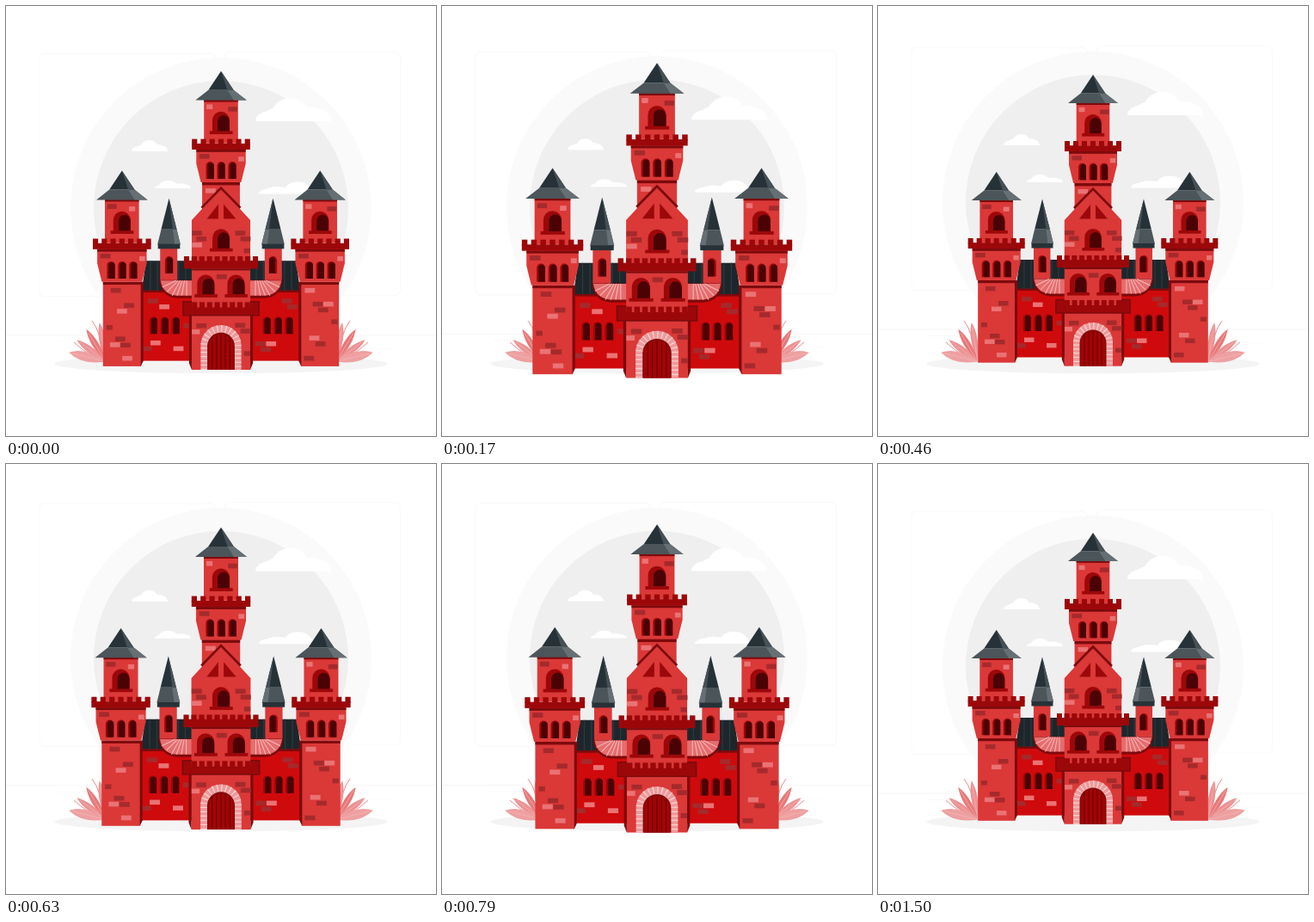
Recreate the animation shown at these times as an HTML page. Size 500 px wide and 500 px high, loop 1540 ms.

```html
<!DOCTYPE html>
<html lang="en">
<head>
<meta charset="utf-8">
<title>Castle</title>
<style>
  html, body { margin: 0; width: 100%; height: 100%; overflow: hidden; background: #fff; }
  svg { display: block; width: 100%; height: 100%; }
</style>
</head>
<body>
<svg id="stage" viewBox="0 0 500 500"></svg>
<script>
const RED = '#db3838', WALL = '#cf0a0c', DEEP = '#9c080a', SHADE = '#7d0a0c', NIGHT = '#4a0204';
const BRICK = '#a52a2b', PALE = '#ea7374', SLATE = '#263238', GREY = '#4b555a', STONE = '#f5baba';

const rect = (x, y, w, h, fill) => `<rect x="${x}" y="${y}" width="${w}" height="${h}" fill="${fill}"/>`;
const poly = (points, fill) => `<polygon points="${points}" fill="${fill}"/>`;
const path = (d, fill, more = '') => `<path d="${d}" fill="${fill}" ${more}/>`;
const line = (d, color, width, more = '') => path(d, 'none', `stroke="${color}" stroke-width="${width}" ${more}`);
const group = (transform, body) => `<g transform="${transform}">${body}</g>`;
const mirror = body => body + group('translate(500 0) scale(-1 1)', body);
const repeat = (n, draw) => Array.from({ length: n }, (_, i) => draw(i)).join('');

const arch = (x, y, w, h, fill) =>
  path(`M${x} ${y + h}v${w / 2 - h}a${w / 2} ${w / 2} 0 0 1 ${w} 0v${h - w / 2}z`, fill);
const bigWindow = (x, y) =>
  arch(x, y, 19.5, 23, DEEP) + arch(x + 6, y + 4, 13.5, 19, NIGHT) + rect(x - 3, y + 22, 26, 3.6, DEEP);
const slit = (x, y) => arch(x, y, 9, 19.5, DEEP) + arch(x + 2, y + 1, 7, 18.5, NIGHT);
const slits = (x, y) => repeat(3, i => slit(x + i * 12.6, y));

const brick = (x, y, fill, w = 11.5) => rect(x, y, w, 5.4, fill);
// Two bricks in neighbouring courses, the lower one shifted sideways
const bond = (x, y, shift, upper = BRICK, lower = PALE) => brick(x, y, upper) + brick(x + shift, y + 6.6, lower);

const merlons = (x, y, w, n) => repeat(n, i => rect(x + i * (w - 6) / (n - 1), y, 6, 6.5, DEEP));
const battlement = (x, y, w, h, n) => merlons(x, y, w, n) + rect(x, y + 5.2, w, h - 5.2, DEEP);

// Cone split into a dark tip, a grey foot and a lit right side
const facets = (top, bottom, y, end) =>
  poly([-top, y, top, y, bottom, end, -bottom, end], GREY) +
  poly([top / 2, y, top, y, bottom, end, bottom / 2, end], '#667074') +
  poly([0, 0, top, y, -top, y], SLATE) +
  poly([0, 0, top, y, top / 2, y], '#465157');

// Tower head, drawn from the tip of its roof
const towerHead = (x, y, near, far) => group(`translate(${x} ${y})`,
  rect(-19.3, 32, 38.6, 50, RED) + rect(-19.3, 32, 38.6, 3, SHADE) +
  brick(-16.5, 37.8, near, near === BRICK ? 10.5 : 7) + brick(8, 40.5, far, far === BRICK ? 10.5 : 7) +
  facets(14.3, 29, 21.5, 33) +
  bigWindow(-9.8, 46) +
  poly('-28,88 28,88 28,105 22.8,126 -22.8,126 -28,105', RED) +
  rect(-28, 89, 56, 2.8, SHADE) +
  brick(-24.5, 94, BRICK) + brick(19.7, 97, PALE, 6.5) +
  battlement(-33, 77, 66, 12, 7) +
  slits(-17, 102.8));

const turret = group('translate(191 224.5)',
  rect(-10, 55, 19.5, 40, RED) + slit(-4.5, 65.5) +
  facets(8.8, 13, 35, 52) +
  rect(-12.5, 51.5, 25, 5.5, SLATE));

const wing =
  poly('165,295 218,295 218,330 160,330', '#1d272b') +
  repeat(6, i => line(`M${170 + i * 8} 295V329`, '#35424a', .8)) +
  rect(160, 329, 58, 79.5, WALL) + rect(160, 328.5, 58, 2.5, SHADE) +
  turret +
  path('M180 317H218V337.5H200Q182 336 180 317z', SHADE) +
  path('M181.5 317.5H218V334.5H200Q184 333.5 181.5 317.5z', '#e56d6e') +
  repeat(6, i => line(`M${199 + i * 2.4} 317.5L${183.5 + i * 5.5} ${325 + Math.min(9.5, i * 5)}`, STONE, 1));

const base =
  rect(116.2, 319, 43.3, 95.7, RED) +
  poly('159,319 162,319 162,408.5 159,414.7', SHADE) +
  rect(116.2, 319, 43.3, 3.2, SHADE);

const keep =
  rect(228.6, 205, 42.8, 45, RED) + rect(228.6, 206, 42.8, 3.4, SHADE) + brick(232.5, 213, PALE) +
  towerHead(250, 80, PALE, BRICK) +
  poly('250,213 283.2,249 283.2,418.7 216.8,418.7 216.8,249', RED) +
  line('M228 235L250 212.5L272 235', SHADE, 2.6) +
  poly('234,247.5 247,231 247,247.5', DEEP) + poly('253,231 253,247.5 267,247.5', DEEP) +
  bond(217, 261, 5, BRICK, BRICK) + brick(217, 274.5, PALE) + bond(266, 261, 6, BRICK, BRICK) +
  brick(276, 281, BRICK, 7) + brick(245, 310.5, BRICK) +
  bigWindow(240.3, 259) +
  battlement(208, 290, 84, 14, 10) + rect(217, 304, 66, 2, SHADE) +
  bigWindow(223, 311) + bigWindow(257.3, 311) +
  mirror(poly('213.8,357 216.8,357 216.8,418.7 213.8,411', SHADE)) +
  rect(207, 341.5, 86, 15.5, DEEP) + rect(217, 341, 66, 7, RED) +
  merlons(217, 342, 66, 8) +
  line('M217 341.5H207V357H293V341.5H283', SHADE, 1.6) +
  brick(222, 366, BRICK) + bond(266, 365.5, 6, BRICK, BRICK) + brick(217, 373, PALE, 9) + brick(276, 397.5, BRICK, 7) +
  arch(227, 368, 46, 50.7, '#ee9a9b') +
  line('M231 418.7V391a19 19 0 0 1 38 0V418.7', '#f8d2d2', 8, 'stroke-dasharray="1.2 3.6"') +
  arch(234.5, 376.5, 31, 42.2, SHADE) + arch(235.7, 378, 28.6, 40.7, '#a00506') +
  repeat(5, i => line(`M${240 + i * 5} ${381 - 3 * Math.sin(i * Math.PI / 4)}V418.5`, '#6b0305', 1));

const castle =
  mirror(wing) +
  slits(168.8, 358.5) + slits(297.3, 358.5) +
  bond(167, 338, 13) + bond(170, 385.5, -10, PALE, BRICK) + brick(196, 392, PALE) + brick(207.5, 366, BRICK) +
  bond(319, 338, 6, BRICK, BRICK) + bond(289, 386.5, 6, BRICK, BRICK) + brick(301, 386.5, PALE) +
  mirror(base) +
  towerHead(137.7, 193, BRICK, PALE) + towerHead(362.3, 193, PALE, BRICK) +
  brick(125, 326, BRICK) + bond(140, 343, -8) + brick(120, 368, BRICK, 7) +
  bond(130, 381, -6) + brick(136, 388, BRICK) + brick(138, 403, PALE) +
  brick(345, 326, PALE) + bond(354, 341.5, 6, BRICK, BRICK) + brick(366, 341.5, PALE) +
  brick(375, 361.5, BRICK, 7) + bond(350, 380, 7, PALE, BRICK) + brick(344, 403, BRICK) +
  keep;

// Leaf with its root at the origin, pointing along the angle
const leaf = (angle, length, width, fill) => group(`translate(116 413.5) rotate(${angle})`,
  path(`M0 0Q${length * .6} ${-width} ${length} 0Q${length * .6} ${width} 0 0`, fill) +
  line(`M0 0H${length * .9}`, STONE, .6));
const plant =
  line('M113 413Q94 405 79 391M113 410Q111 380 100 366', '#e98c8d', 1) +
  repeat(4, i => leaf(261 - i * 22, 46 - i * 2, 7.5, i % 2 ? '#e67879' : '#eb9293')) +
  leaf(194, 44, 11, '#eea0a1');

// Flat-bottomed cloud with three bumps, the tallest at "peak" of its width
const cloud = (x, y, w, h, peak) => {
  const bump = (from, to, height) => {
    const rise = y - h * height * 1.33;
    return `M${x + w * from} ${y}C${x + w * from} ${rise} ${x + w * to} ${rise} ${x + w * to} ${y}z`;
  };
  return path(bump(0, .45, .45) + bump(peak - .28, peak + .26, 1) + bump(peak - .05, 1, .6) +
    bump(.08, .6, .6), '#fff');
};
const clouds =
  cloud(290, 134, 88, 27, .47) + cloud(146, 169, 42, 13, .5) +
  cloud(173, 212, 42, 9, .38) + cloud(294, 218.5, 64, 14, .72);

const circle = (r, fill) => `<circle cx="250" cy="235" r="${r}" fill="${fill}"/>`;
const panel = (x, y) =>
  `<rect x="${x}" y="${y}" width="204" height="282.5" rx="5.5" fill="none" stroke="#f9f9f9"/>`;

const backdrop =
  panel(39, 55.2) + panel(254.5, 53.8) +
  line('M0 383H500', '#f6f6f6', 1) +
  line('M416 398.5H449M58 390.5H101M396 391.5H420', '#f9f9f9', .8) +
  circle(175, '#fafafa') + circle(148, '#efefef') + clouds;

document.getElementById('stage').innerHTML =
  `<g id="backdrop">${backdrop}</g>
  <ellipse cx="250" cy="416" rx="193.5" ry="11.3" fill="#f4f4f4"/>
  ${mirror(plant)}
  <g id="castle">${castle}</g>`;

const sky = document.getElementById('backdrop');
const fort = document.getElementById('castle');
const LOOP = 1540, LEAD = 40;

// Straight rise to the peak, then a softened fall
const beat = (t, start, peak, end, size) =>
  t <= start || t >= end ? 0 :
  t < peak ? size * (t - start) / (peak - start) :
  size * ((end - t) / (end - peak)) ** 1.25;

function draw() {
  const t = (performance.now() + LEAD) % LOOP;
  const lift = 9.6 * (1 - Math.cos(2 * Math.PI * t / LOOP)) / 2;
  const scale = 1 + beat(t, 0, 160, 502, .1) + beat(t, 619, 740, 1078, .086);
  sky.setAttribute('transform', `translate(0 ${-lift})`);
  fort.setAttribute('transform', `translate(250 249.5) scale(${scale}) translate(-250 -249.5)`);
  requestAnimationFrame(draw);
}
draw();
</script>
</body>
</html>
```
